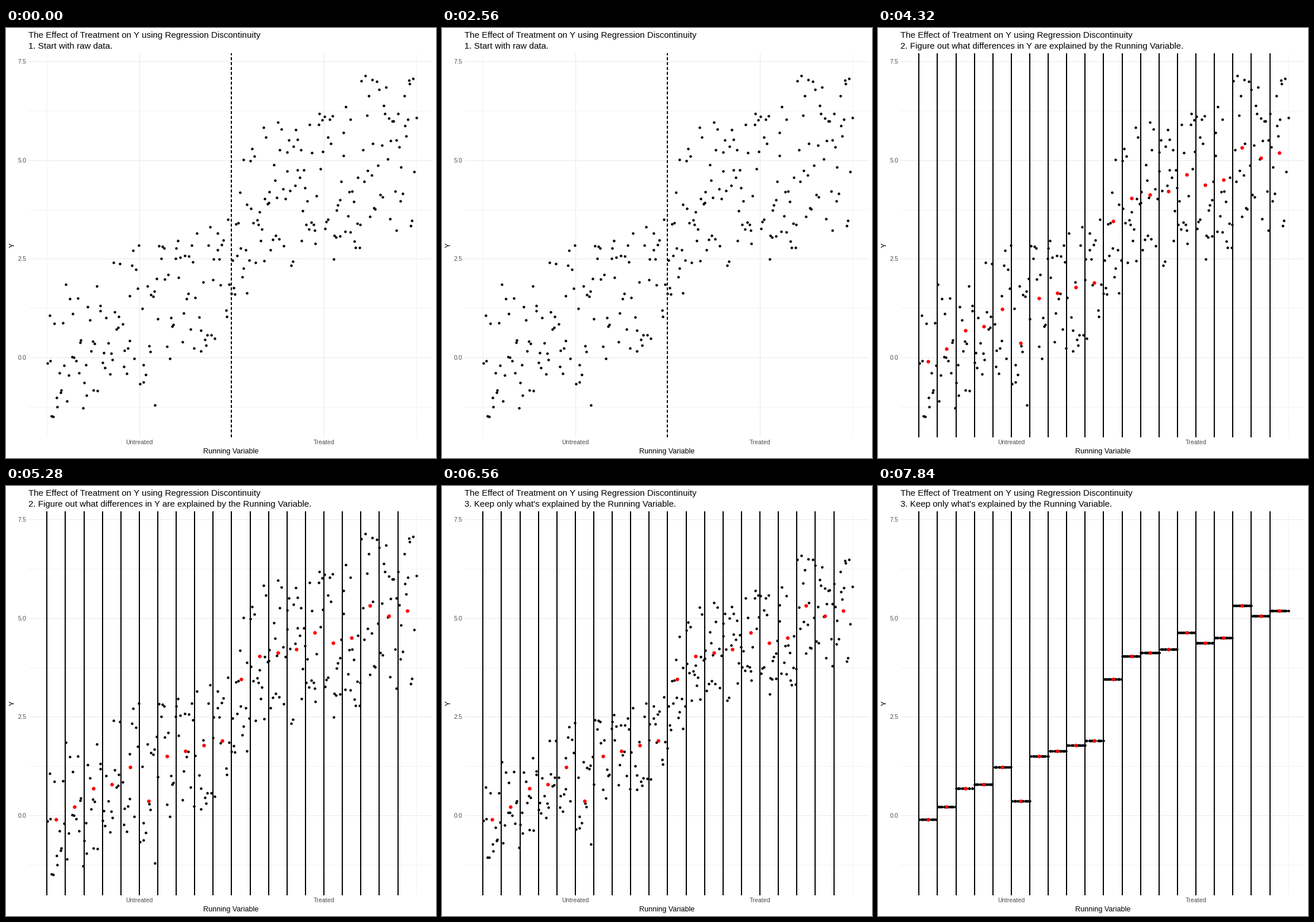
A matplotlib script for the animation above (8000 ms loop, 748 px wide and 748 px high).

```python
import math

import matplotlib.pyplot as plt
import numpy as np
from matplotlib.animation import FuncAnimation

SIZE, DPI = 748, 88
PX = 72 / DPI                       # points per pixel
FRAMES, INTERVAL = 50, 160

LEFT, RIGHT, TOP, BOTTOM = 39.5, 743, 44, 711.5
X0, BIN_W, BINS = 71.3, 32.12, 20   # first bin edge, bin width, bin count
Y0, UNIT = 572.9, 68.6              # height of Y = 0 and pixels per unit

TITLE_AT = 25                       # second heading
BINS_AT = 27                        # bin edges and means appear
MOVE_FROM, MOVE_TO = 38, 46         # dots slide to their bin mean

HEAD = "The Effect of Treatment on Y using Regression Discontinuity"
STEPS = [
    "1. Start with raw data.",
    "2. Figure out what differences in Y are explained by the Running Variable.",
    "3. Keep only what's explained by the Running Variable.",
]

# mean of Y in each bin
MEANS = np.array([-0.10, 0.22, 0.68, 0.79, 1.22, 0.36, 1.50, 1.63, 1.77, 1.90,
                  3.45, 4.04, 4.12, 4.21, 4.63, 4.37, 4.51, 5.32, 5.06, 5.19])


def to_x(bins):
    return X0 + BIN_W * bins


def to_y(value):
    return Y0 - UNIT * value


def make_dots(rng):
    """Position along the bins, raw Y and bin mean of every dot."""
    # (position, spread of Y, number of dots) on each side of the cutoff
    sides = [(0, 1.65, 132), (BINS / 2, 1.9, 157)]
    pos, noise = [], []
    for start, spread, n in sides:
        pos.append(start + (np.arange(n) + rng.random(n)) * BINS / 2 / n)
        noise.append(rng.uniform(-spread, spread, n))
    pos = np.concatenate(pos)
    goal = MEANS[pos.astype(int)]
    return pos, goal + np.concatenate(noise), goal


def sine_in_out(t):
    return (1 - math.cos(math.pi * min(max(t, 0), 1))) / 2


fig = plt.figure(figsize=(SIZE / DPI, SIZE / DPI), dpi=DPI, facecolor="white")
ax = fig.add_axes([0, 0, 1, 1])
ax.set_xlim(0, SIZE)
ax.set_ylim(SIZE, 0)
ax.axis("off")


def label(x, y, text, size, color="black", **kw):
    return ax.text(x, y, text, fontsize=size * PX, color=color,
                   family="Liberation Sans", **kw)


def dots(x, y, size, color, z):
    return ax.plot(x, y, "o", ms=size * PX, mew=0, color=color, zorder=z)[0]


def grid_style(major):
    return dict(color="#ebebeb", lw=(1.1 if major else 0.6) * PX, zorder=0)


for k in range(-1, 7):
    y = to_y(k * 1.25)
    major = k % 2 == 0
    ax.hlines(y, LEFT, RIGHT, **grid_style(major))
    if major:
        label(35, y + 4, f"{k * 1.25:.1f}", 10.8, "#4d4d4d", ha="right")

for k in range(5):
    ax.vlines(to_x(5 * k), TOP, BOTTOM, **grid_style(k % 2 == 1))
for k, name in ((5, "Untreated"), (15, "Treated")):
    label(to_x(k), 724.5, name, 10.6, "#4d4d4d", ha="center")

label((LEFT + RIGHT) / 2, 740, "Running Variable", 12.65, ha="center")
label(14.5, (TOP + BOTTOM) / 2, "Y", 12.65, rotation=90,
      rotation_mode="anchor", ha="center", va="baseline")
label(39, 16.7, HEAD, 15.15)
step_text = label(39, 35.5, STEPS[0], 15.15)

cutoff = to_x(BINS / 2)
ax.plot([cutoff, cutoff], [BOTTOM, TOP], color="black", lw=2 * PX,
        ls=(0, (2.6, 1.66)), dash_capstyle="butt", zorder=3)

pos, raw, goal = make_dots(np.random.default_rng(12))
points = dots(to_x(pos), to_y(raw), 4.5, "black", 2)
edges = ax.vlines(to_x(np.arange(BINS)), TOP, BOTTOM,
                  color="black", lw=2 * PX, zorder=3)
means = dots(to_x(np.arange(BINS) + 0.5), to_y(MEANS), 6.3, "red", 4)


def draw(i):
    step_text.set_text(STEPS[(i >= TITLE_AT) + (i > MOVE_FROM)])
    edges.set_visible(i >= BINS_AT)
    means.set_visible(i >= BINS_AT)
    e = sine_in_out((i - MOVE_FROM) / (MOVE_TO - MOVE_FROM))
    points.set_ydata(to_y(raw + (goal - raw) * e))
    return step_text, edges, means, points


anim = FuncAnimation(fig, draw, frames=FRAMES, interval=INTERVAL,
                     init_func=lambda: draw(0), repeat=True, repeat_delay=0)
plt.show()
```
